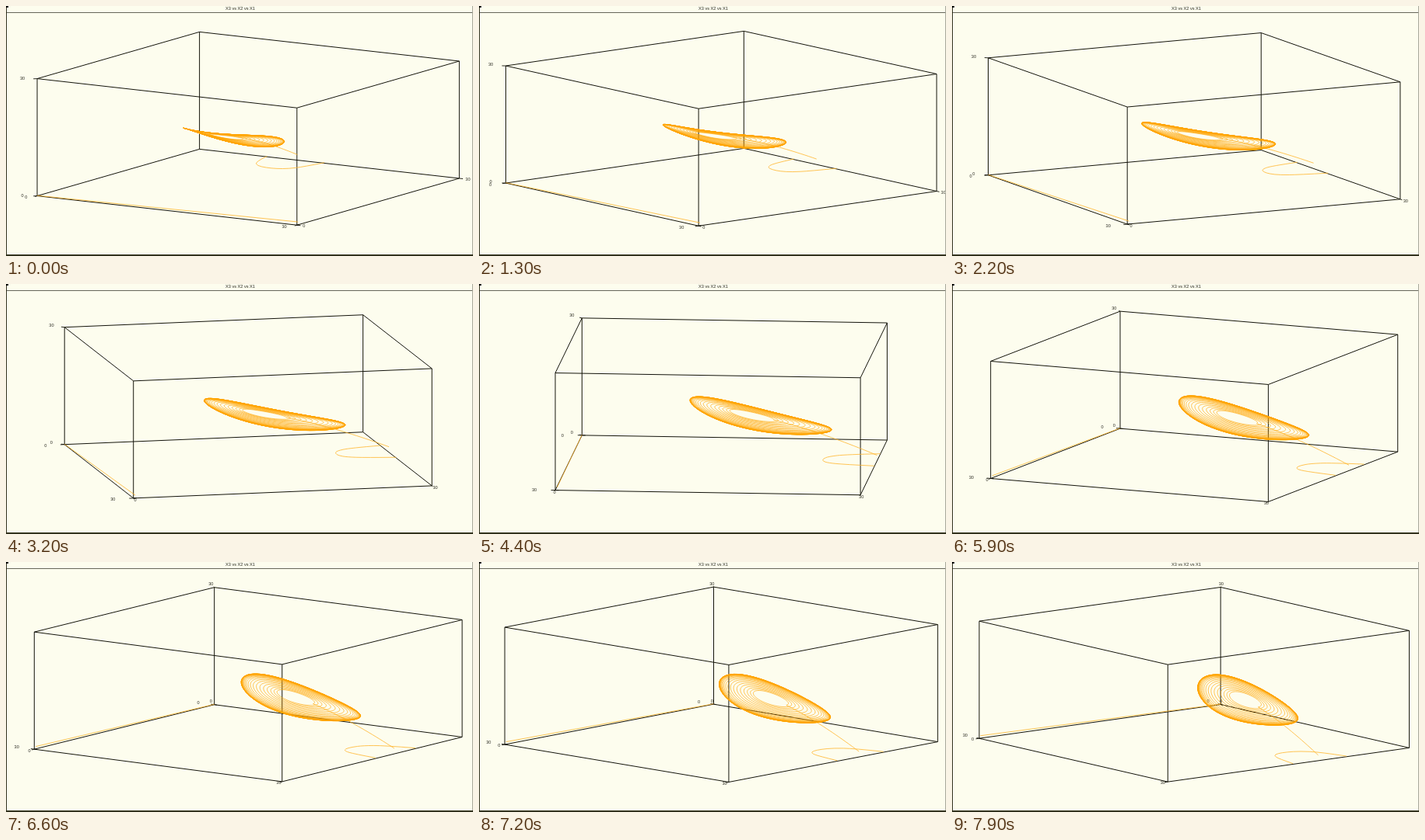
An HTML page with a canvas for the animation above (8000 ms loop, 600 px wide and 322 px high).

```html
<!DOCTYPE html>
<html lang="en">
<head>
<meta charset="utf-8">
<title>Phase portrait</title>
<style>
html, body { margin: 0; width: 100%; height: 100%; overflow: hidden; background: #fdfdee; }
canvas { display: block; }
</style>
</head>
<body>
<canvas id="stage" width="600" height="322"></canvas>
<script>
const ctx = document.getElementById('stage').getContext('2d');
const LOOP = 8000, STEP = 100;
const CX = 311.2, CY = 233.3, RX = 278.3, RY = 50.2, HEIGHT = 151;
const RAD = Math.PI / 180;
const INK = '#14140c', ORANGE = '#ffa500', PALE = '#ffb52e';

// [step, view angle in degrees]
const TURN = [[0, 167], [13, 186], [27, 205], [32, 212], [36, 218], [44, 230],
  [45, 231], [46, 233], [47, 233], [59, 250], [66, 261], [79, 277]];

function viewAngle(step) {
  let i = 1;
  while (i < TURN.length - 1 && TURN[i][0] < step) i++;
  const [s0, a0] = TURN[i - 1], [s1, a1] = TURN[i];
  return Math.round(a0 + (a1 - a0) * (step - s0) / (s1 - s0)) * RAD;
}

// Axis fractions 0..1 to centred floor coordinates
const world = (x1, x2, x3) => [1 - x1 - x2, x1 - x2, x3];

// Coordinates along the long and short axis of the limit cycle
const disc = (u, v, h) => [0.011 - 0.7466 * u + 0.665 * v, -0.248 - 0.665 * u - 0.7466 * v, h];

// Slowly growing turns on a tilted, slightly bent disc
function spiral() {
  const pts = [], turns = 26, perTurn = 72;
  for (let i = 0; i <= turns * perTurn; i++) {
    const n = i / perTurn, th = n * 2 * Math.PI;
    const s = 1 / Math.sqrt(1 + 10.1 * Math.exp(-0.36 * n));
    const c = Math.cos(th), d = Math.sin(th);
    const tilt = s * (0.031 * d - 0.116 * c);
    const bow = s * s * (0.024 * Math.cos(2 * th) - 0.01 * Math.sin(2 * th) - 0.01);
    pts.push(disc(0.33 * s * c - 0.06 * (1 - s), 0.165 * s * d + 0.027 * (1 - s), 0.36 + tilt + bow));
  }
  return pts;
}

function bezier(a, b, c) {
  return Array.from({ length: 25 }, (_, i) => {
    const t = i / 24, r = 1 - t;
    return a.map((v, k) => r * r * v + 2 * r * t * b[k] + t * t * c[k]);
  });
}

const cycle = spiral();
const entry = bezier(world(0.377, 1, 0.047), disc(0.27, 0.022, 0.24), cycle[0]);
const start = [world(0, 0, 0.003), world(1, 0.006, 0.025)];
const bend = [[0.26, 1], [0.283, 0.89], [0.325, 0.836], [0.368, 0.822], [0.407, 0.824],
  [0.44, 0.845], [0.463, 0.9], [0.481, 1]].map(([x1, x2]) => world(x1, x2, 0.005));

function draw(step) {
  const phi = viewAngle(step), cos = Math.cos(phi), sin = Math.sin(phi);
  const project = ([p, q, h]) =>
    [CX + RX * (p * cos + q * sin), CY + RY * (p * sin - q * cos) - HEIGHT * h];

  function stroke(pts, color, width, smooth) {
    const s = pts.map(project), last = s.length - 1;
    ctx.strokeStyle = color;
    ctx.lineWidth = width;
    ctx.beginPath();
    ctx.moveTo(...s[0]);
    for (let i = 1; i <= last; i++) {
      if (smooth && i < last) {
        const end = i === last - 1 ? s[last] : [(s[i][0] + s[i + 1][0]) / 2, (s[i][1] + s[i + 1][1]) / 2];
        ctx.quadraticCurveTo(...s[i], ...end);
      } else ctx.lineTo(...s[i]);
    }
    ctx.stroke();
  }

  function tick([x, y], dx, dy, back = 0) {
    ctx.strokeStyle = INK;
    ctx.lineWidth = 0.9;
    ctx.beginPath();
    ctx.moveTo(x - dx * back, y - dy * back);
    ctx.lineTo(x + dx, y + dy);
    ctx.stroke();
  }

  function label(text, [x, y], dx, dy) {
    ctx.fillText(text, x + dx, y + dy);
  }

  ctx.fillStyle = '#fdfdee';
  ctx.fillRect(0, 0, 600, 322);

  // Box
  const corners = [[0, 0], [0, 1], [1, 1], [1, 0]];
  corners.forEach(([a, b], i) => {
    const [c, d] = corners[(i + 1) % 4];
    stroke([world(a, b, 0), world(c, d, 0)], INK, 1);
    stroke([world(a, b, 1), world(c, d, 1)], INK, 1);
    stroke([world(a, b, 0), world(a, b, 1)], INK, 1);
  });

  // Axis ticks and labels
  const origin = project(world(0, 0, 0)), top = project(world(0, 0, 1));
  const x1End = project(world(1, 0, 0)), x2End = project(world(1, 1, 0));
  const c45 = Math.cos(phi - 45 * RAD), s45 = Math.sin(phi - 45 * RAD);
  ctx.fillStyle = '#2c2c24';
  ctx.font = '5.6px "Liberation Sans", Arial, sans-serif';
  ctx.textAlign = 'center';
  ctx.textBaseline = 'middle';

  for (const [text, at] of [['0', origin], ['30', top]]) {
    tick(at, 5 * cos, 0.9 * sin);
    label(text, at, -1.5 + 18 * cos, -0.8 + 3.3 * sin);
  }
  for (const [text, at, shift] of [['0', origin, -2], ['30', x1End, -4]]) {
    tick(at, 5.5 * c45, s45, 0.8);
    label(text, at, shift + 23 * c45, -3.2 - 5.5 * cos);
  }
  for (const [text, at, shift] of [['0', x1End, 0], ['30', x2End, 2]]) {
    tick(at, 5.5 * s45, -c45);
    label(text, at, shift + 10.7 * s45, 0.4 - 2 * c45);
  }

  // Trajectory
  stroke(start, PALE, 0.8);
  stroke(bend, PALE, 0.8, true);
  stroke(entry, PALE, 0.8);
  stroke(cycle, ORANGE, 0.65);

  // Window frame
  ctx.fillStyle = '#2c2c24';
  ctx.fillText('X3 vs X2 vs X1', 301, 3.6);
  ctx.fillStyle = '#66665a';
  ctx.fillRect(0, 8, 600, 1);
  ctx.fillStyle = '#a8a89a';
  ctx.fillRect(599, 0, 1, 322);
  ctx.fillStyle = '#33331f';
  ctx.fillRect(0, 0, 1, 322);
  ctx.fillRect(0, 320, 600, 2);
  ctx.fillStyle = '#000';
  ctx.fillRect(0, 0, 3, 2);
}

let shown = -1;
const begin = performance.now();
function play() {
  const step = Math.floor(((performance.now() - begin) % LOOP) / STEP);
  if (step !== shown) draw(shown = step);
  requestAnimationFrame(play);
}
play();
</script>
</body>
</html>
```
